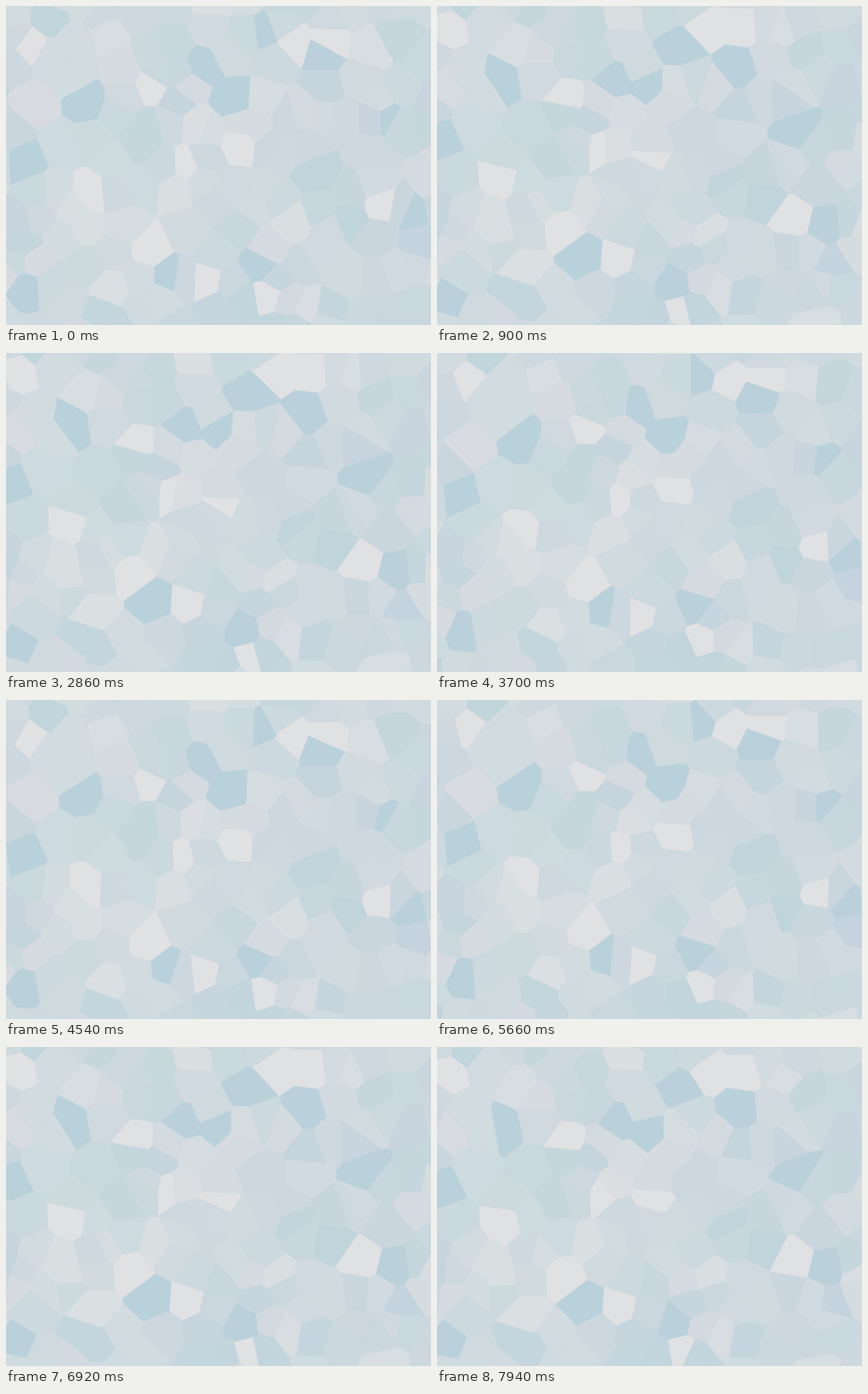
An HTML page with a canvas for the animation above (8000 ms loop, 480 by 360 pixels).

```html
<!DOCTYPE html>
<html>
<head>
<meta charset="utf-8">
<style>
html, body { margin: 0; height: 100%; overflow: hidden; background: #ccd9df; }
canvas { display: block; width: 100vw; height: 100vh; }
</style>
</head>
<body>
<canvas id="stage" width="480" height="360"></canvas>
<script>
const W = 480, H = 360, MARGIN = 40, LOOP = 8000, SITE_COUNT = 215;
const SWAY = 14, LAG_X = 65, LAG_NEAR = 15, LAG_FAR = 245;
const BEAT = 836, HOLD = 100, TURNS_PER_BEAT = 5 / 3;
const ctx = document.getElementById('stage').getContext('2d');

let seed = 20;
function random() {
  seed = (seed * 1664525 + 1013904223) % 4294967296;
  return seed / 4294967296;
}

// Lightness 0 is blue, 1 is near white.
function shade(light, tint = 0) {
  const mix = (a, b) => Math.round(a + (b - a) * light);
  return `rgb(${mix(183, 225)},${mix(208, 226) + tint},${mix(218, 227)})`;
}

const sites = [];
function addSite(x, y, lag, color) {
  sites.push({ x, y, lag, color });
}

// A few prominent cells, by lightness and vertical lag.
const addGroup = (light, lag, ...points) =>
  points.forEach(([x, y]) => addSite(x, y, lag, shade(light)));
addGroup(0.97, LAG_NEAR, [317, 30], [360, 28], [20, 32], [197, 168], [90, 200], [220, 296], [155, 262]);
addGroup(0.97, LAG_FAR, [160, 95], [256, 160], [291, 331], [418, 227]);
addGroup(0.05, LAG_NEAR, [86, 95], [15, 160], [250, 95], [178, 293]);
addGroup(0.08, LAG_FAR, [424, 130], [288, 34], [353, 60], [216, 72], [283, 298], [452, 235], [17, 322]);

// The rest are scattered loosely, each taking the roomiest of a few spots.
const roomAt = (x, y) => Math.min(...sites.map(s => Math.hypot(s.x - x, s.y - y)));
while (sites.length < SITE_COUNT) {
  let best = { room: -1 };
  for (let i = 0; i < 9; i++) {
    const x = random() * (W + 2 * MARGIN) - MARGIN;
    const y = random() * (H + 2 * MARGIN) - MARGIN;
    const room = roomAt(x, y);
    if (room > best.room) best = { x, y, room };
  }
  const lag = (random() < 0.5 ? LAG_NEAR : LAG_FAR) + random() * 50 - 25;
  const light = 0.15 + 0.75 * (random() + random()) / 2;
  addSite(best.x, best.y, lag, shade(light, Math.round(random() * 3 - 2)));
}

// Every beat rests briefly, then turns on at a steady rate.
function turnsAt(time) {
  const beats = Math.floor((time + 20) / BEAT);
  const within = (time + 20) % BEAT;
  return TURNS_PER_BEAT * (beats + Math.max(0, within - HOLD) / (BEAT - HOLD));
}

// Keep the part of a polygon nearer to p than to q.
function clip(polygon, p, q) {
  const nx = q.x - p.x, ny = q.y - p.y;
  const limit = (q.x * q.x + q.y * q.y - p.x * p.x - p.y * p.y) / 2;
  const side = v => v[0] * nx + v[1] * ny - limit;
  const kept = [];
  polygon.forEach((a, i) => {
    const b = polygon[(i + 1) % polygon.length];
    const da = side(a), db = side(b);
    if (da <= 0) kept.push(a);
    if (da * db < 0) {
      const k = da / (da - db);
      kept.push([a[0] + (b[0] - a[0]) * k, a[1] + (b[1] - a[1]) * k]);
    }
  });
  return kept;
}

function draw(time) {
  const angle = turnsAt(time) * 360;
  const sway = lag => SWAY * Math.cos((angle - lag) * Math.PI / 180);
  const moved = sites.map(s => ({
    x: s.x + sway(LAG_X),
    y: s.y + sway(s.lag),
    color: s.color
  }));
  ctx.lineWidth = 0.8;
  ctx.lineJoin = 'round';
  for (const p of moved) {
    let cell = [[-80, -80], [W + 80, -80], [W + 80, H + 80], [-80, H + 80]];
    for (const q of moved) {
      if (q !== p && Math.abs(q.x - p.x) < 140 && Math.abs(q.y - p.y) < 140) {
        cell = clip(cell, p, q);
      }
    }
    ctx.beginPath();
    cell.forEach(([x, y]) => ctx.lineTo(x, y));
    ctx.closePath();
    ctx.fillStyle = ctx.strokeStyle = p.color;
    ctx.fill();
    ctx.stroke();
  }
}

const start = performance.now();
function tick() {
  draw((performance.now() - start) % LOOP);
  requestAnimationFrame(tick);
}
tick();
</script>
</body>
</html>
```
